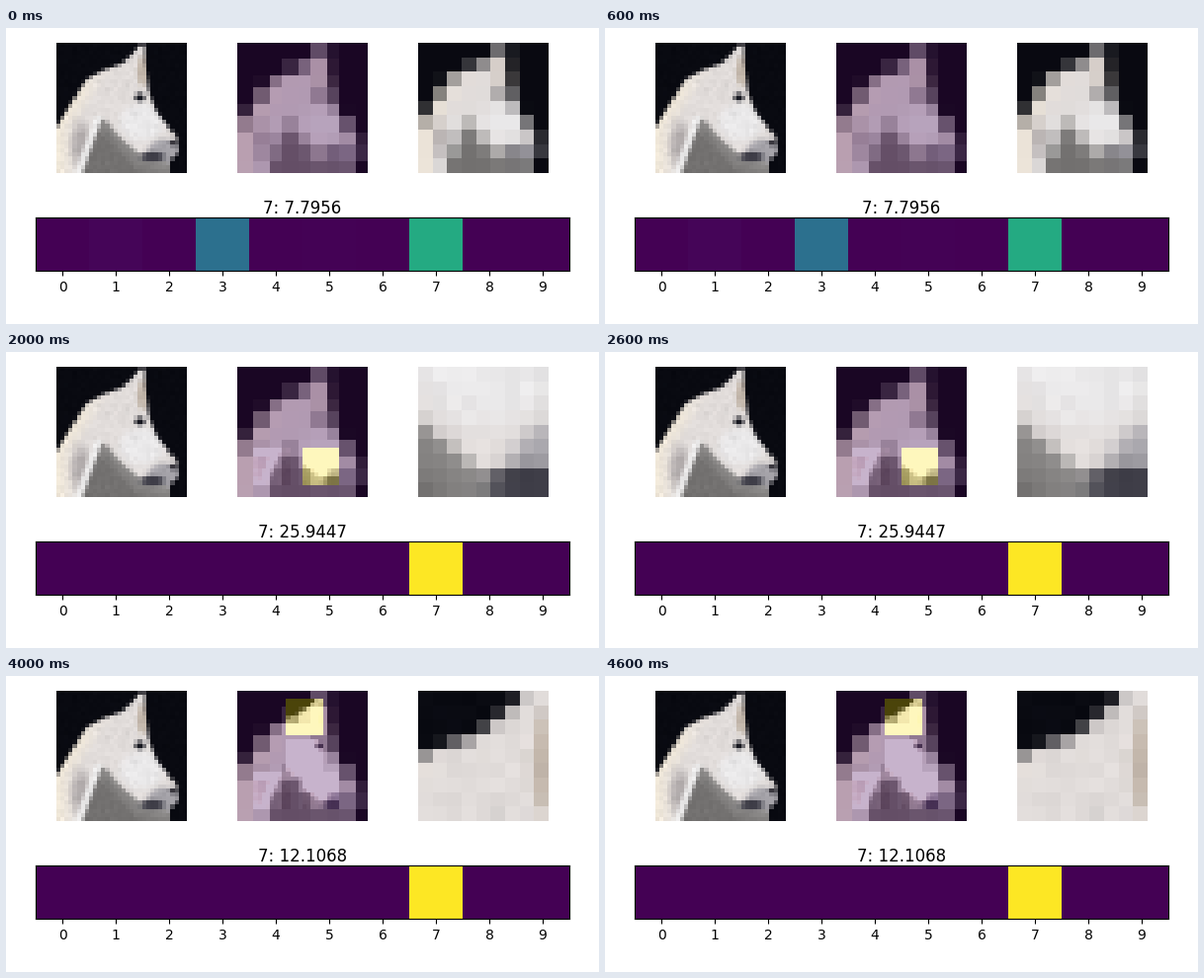
Recreate the animation shown at these times as a matplotlib script. Size 600 px wide and 300 px high, loop 5000 ms.

```python
import numpy as np
import matplotlib.pyplot as plt
from matplotlib.animation import FuncAnimation

N, G, SS = 32, 9, 9          # picture size, glimpse size, supersampling
GLIMPSES = [None, (4, 20), (16, 20), (12, 12), (12, 2)]
SCORES = [7.7956, 20.1881, 25.9447, 19.3448, 12.1068]


def mix(img, colour, weight):
    return img + (np.array(colour) - img) * weight[..., None]


def paint():
    """Horse head from a few edge curves and soft blobs, values 0..1."""
    c = (np.arange(N * SS) + .5) / SS
    x, y = np.meshgrid(c, c)

    def blob(cx, cy, rx, ry, hard=3):
        d = np.hypot((x - cx) / rx, (y - cy) / ry)
        return np.clip((1 - d) * hard + .3, 0, 1)

    crest = np.interp(y, [.6, 3, 5, 6.5, 9, 13, 21],
                      [20.6, 18.6, 16.2, 12, 7.4, 4.8, 0])
    face = np.interp(y, [.6, 5, 12, 17, 23, 27, 29],
                     [21.6, 21.8, 22.6, 24.6, 29.4, 30, 28])
    jaw = np.interp(x, [9, 12, 16, 20, 29], [17.5, 19, 23.5, 27, 30])
    edge = 9.8 - .37 * (y - 20)          # bright fold down the shoulder

    coat = np.broadcast_to((225., 220, 218), x.shape + (3,))
    coat = mix(coat, (243, 234, 218), np.clip(1 - (x - crest) / 5, 0, 1)
               * np.clip((y - 6) / 6, 0, 1))
    coat = mix(coat, (180, 174, 174), blob(6, 25, 2.6, 6, 1.5))
    coat = mix(coat, (234, 233, 234), blob(21, 19.5, 6, 5, 2))
    coat = mix(coat, (194, 182, 170), blob(21.2, 7, 1.4, 4))
    coat = mix(coat, (165, 163, 169), blob(27, 27, 5, 3.5))

    depth = np.clip((y - jaw) / 5, 0, 1)
    shadow = (145 - 32 * depth)[..., None] + np.array([2, 0, -1])
    coat = np.where(((y > jaw) & (x > edge))[..., None], shadow, coat)
    coat = mix(coat, (237, 236, 236),
               (y > 18) * np.clip(2 - 1.6 * abs(x - edge), 0, 1))

    coat = mix(coat, (62, 61, 71), blob(23.6, 28, 3.2, 1.2))
    coat = mix(coat, (60, 58, 66), blob(28.6, 24.6, .8, .8))
    coat = mix(coat, (22, 23, 31), blob(20.5, 13.4, 1.2, 1))

    body = (x > crest) & (x < face) & (y > .6)
    return np.where(body[..., None], coat, (9, 10, 17)) / 255


def block_mean(a, n):
    k = len(a) // n
    return a.reshape(n, k, n, k, 3).mean(axis=(1, 3))


big = paint()
low, fine = block_mean(big, G), block_mean(big, N)
grain = np.random.default_rng(3).normal(0, .012, (N, N, 1))
fine = np.clip(fine + grain * (.2 + fine), 0, 1)
step = np.arange(N) * G // N
coarse = low[np.ix_(step, step)]


def window(pos):
    x, y = pos
    return slice(y, y + G), slice(x, x + G)


def state(i):
    """Canvas, mask, close-up and class probabilities at one step."""
    canvas, mask = coarse.copy(), np.zeros((N, N))
    for pos in GLIMPSES[1:i + 1]:
        w = window(pos)
        canvas[w] = np.clip(coarse[w] + fine[w] - .5, 0, 1)
    probs = np.zeros((1, 10))
    if i == 0:
        probs[0, [1, 3, 5, 7]] = .015, .37, .004, .61
        return canvas, mask, low, probs
    w = window(GLIMPSES[i])
    mask[w] = 1
    probs[0, 7] = 1
    return canvas, mask, fine[w], probs


fig = plt.figure(figsize=(6, 3), dpi=100, facecolor="white")
fig.subplots_adjust(left=.05, right=.95, bottom=.05, top=.95,
                    wspace=.05, hspace=.05)
photo_ax, canvas_ax, zoom_ax = (fig.add_subplot(2, 3, k) for k in (1, 2, 3))
bar_ax = fig.add_subplot(2, 1, 2)
for ax in (photo_ax, canvas_ax, zoom_ax):
    ax.axis("off")

heat = dict(cmap="viridis", vmin=0, vmax=1, interpolation="nearest")
canvas, mask, zoom, probs = state(0)
photo_ax.imshow(fine, interpolation="nearest")
images = (canvas_ax.imshow(canvas, interpolation="nearest"),
          canvas_ax.imshow(mask, alpha=.3, **heat),
          zoom_ax.imshow(zoom, interpolation="nearest"),
          bar_ax.imshow(probs, **heat))
bar_ax.set_xticks(range(10))
bar_ax.set_yticks([])
title = bar_ax.set_title("", fontsize=12, pad=1.1)


def update(i):
    for im, data in zip(images, state(i)):
        im.set_data(data)
    title.set_text(f"7: {SCORES[i]:.4f}")
    return *images, title


anim = FuncAnimation(fig, update, frames=len(SCORES), interval=1000,
                     repeat=True, repeat_delay=0, blit=False)
plt.show()
```
